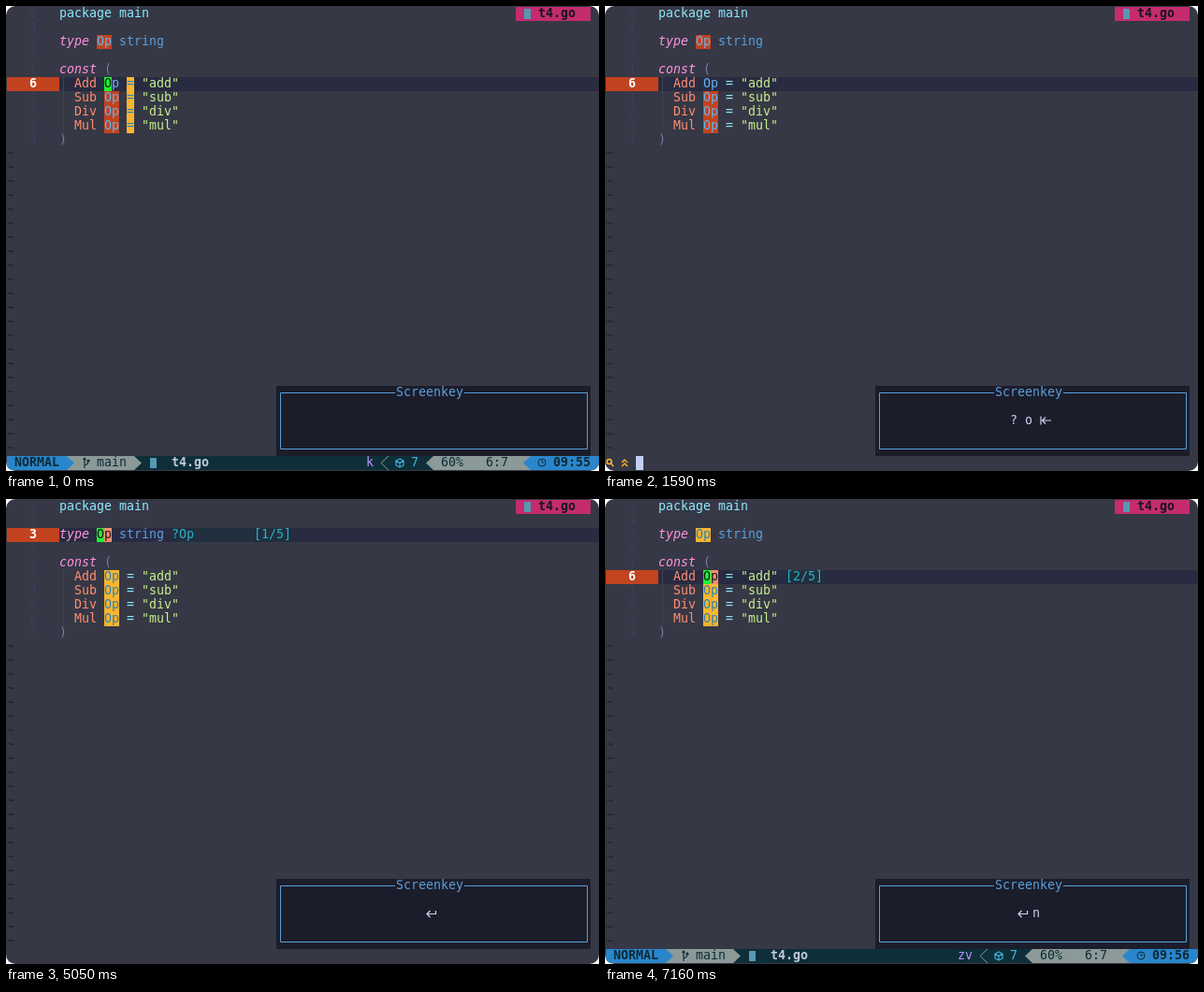
Animation, 634 px wide and 497 px high, one loop 8000 ms. Source, as an HTML page with a canvas:

```html
<!DOCTYPE html>
<html lang="en">
<head>
<meta charset="utf-8">
<title>Backward search in a terminal editor</title>
<style>
  html, body { margin: 0; width: 100%; height: 100%; overflow: hidden; background: #fff; }
  canvas { display: block; width: 634px; height: 497px; }
</style>
</head>
<body>
<canvas id="screen" width="634" height="497"></canvas>
<script>
const ctx = document.getElementById('screen').getContext('2d');
const CELL_W = 8, CELL_H = 15, LOOP = 8000, BOTTOM = 33;
const COLOR = {
  bg: '#363845', line: '#292b41', number: '#c2431f', dim: '#3c3e5a', tilde: '#20222f',
  cyan: '#8be9fd', blue: '#5a9fdc', type: '#61b5f2', pink: '#ff92df', orange: '#ff8d70',
  string: '#c6f08e', paren: '#6f7cab', match: '#fdb52e', matchText: '#2b83b8',
  current: '#ff8c6e', cursor: '#1cf52e', dark: '#14151f', hint: '#26b3c4', hintBg: '#212f3f',
  panel: '#1c1d2a', light: '#c9d3f0', bar: '#0e2f39', gray: '#8b9a98',
  accent: '#2a86cb', ink: '#0d2a35', pale: '#c0cad8', purple: '#b596f5', tab: '#c42c6d'
};

// search: highlighted pattern; prompt: command line text; crumb: status bar symbol
const steps = [
  { at: 0, line: 6, search: '=', keys: '', status: '09:55', pending: 'k' },
  { at: 540, line: 6, search: '=', keys: '?' },
  { at: 800, line: 6, search: '=', keys: '?', prompt: '' },
  { at: 1060, line: 5, search: 'o', keys: '?o', prompt: 'o' },
  { at: 1590, line: 6, search: '', keys: '?o⇤', prompt: '' },
  { at: 1850, line: 3, search: 'O', keys: '?o⇤O', prompt: 'O' },
  { at: 2110, line: 3, search: 'Op', keys: '?o⇤Op', prompt: 'Op' },
  { at: 5050, line: 3, search: 'Op', keys: '↩', hint: true },
  { at: 5310, line: 3, search: 'Op', keys: '↩', hint: true, status: '09:56', pending: '?', crumb: true },
  { at: 6370, line: 6, search: 'Op', keys: '↩n', hint: true, status: '09:56', pending: 'zv', crumb: true },
  { at: 6640, line: 6, search: 'Op', keys: '↩n', hint: true, status: '09:56', pending: 'zv' }
];

const colX = col => 1 + col * CELL_W;
const rowY = row => 1 + (row - 1) * CELL_H;

function fill(row, col, cols, color, rows = 1) {
  ctx.fillStyle = color;
  ctx.fillRect(colX(col), rowY(row), cols * CELL_W, rows * CELL_H);
}

function put(row, col, text, color, style = '', bg) {
  if (bg) fill(row, col, text.length, bg);
  ctx.font = `${style} 13.29px "DejaVu Sans Mono", monospace`;
  ctx.fillStyle = color;
  [...text].forEach((char, i) => ctx.fillText(char, colX(col + i), rowY(row) + 11));
}

function stroke(color, path, x = 0, y = 0, width = 1.2) {
  ctx.save();
  ctx.translate(x, y);
  ctx.strokeStyle = color;
  ctx.lineWidth = width;
  ctx.stroke(new Path2D(path));
  ctx.restore();
}

// Powerline wedge on the status bar: dir 1 points right, -1 points left
function wedge(col, color, dir) {
  const base = colX(dir > 0 ? col : col + 1), y = rowY(BOTTOM);
  ctx.fillStyle = color;
  ctx.beginPath();
  ctx.moveTo(base, y);
  ctx.lineTo(base + dir * CELL_W, y + CELL_H / 2);
  ctx.lineTo(base, y + CELL_H);
  ctx.fill();
}

function fileIcon(row, col) {
  ctx.fillStyle = '#5599b3';
  ctx.fillRect(colX(col) + 1, rowY(row) + 2, 7, 11);
}

function drawOp(row, col, step) {
  const current = row === step.line;
  const matched = step.search === 'Op' ? 2 : /^o$/i.test(step.search) ? 1 : 0;
  [...'Op'].forEach((char, i) => {
    let bg = row === 6 ? null : COLOR.number, color = COLOR.type;
    if (i < matched) {
      bg = current ? COLOR.current : COLOR.match;
      color = current ? COLOR.dark : COLOR.matchText;
    }
    if (current && i === 0 && step.prompt === undefined) {
      bg = COLOR.cursor;
      color = COLOR.dark;
    }
    put(row, col + i, char, color, '', bg);
  });
}

function drawBuffer(step) {
  fill(step.line, 0, 79.2, COLOR.line);
  fill(step.line, 0, 7, COLOR.number);
  for (let row = 1; row <= 10; row++) {
    if (row === step.line) put(row, 3, String(row), '#fff', 'bold');
    else put(row, 3, String(Math.abs(row - step.line)), COLOR.dim);
  }
  for (let row = 11; row < BOTTOM; row++) put(row, 0, '~', COLOR.tilde);

  put(1, 7, 'package main', COLOR.cyan);
  put(3, 7, 'type', COLOR.pink, 'italic');
  drawOp(3, 12, step);
  put(3, 15, 'string', COLOR.blue);
  put(5, 7, 'const', COLOR.pink, 'italic');
  if (step.search === 'o') put(5, 8, 'o', COLOR.dark, 'italic', COLOR.current);
  put(5, 13, '(', COLOR.paren);
  ['Add', 'Sub', 'Div', 'Mul'].forEach((name, i) => {
    const row = 6 + i, equals = step.search === '=';
    ctx.fillStyle = '#414353';
    ctx.fillRect(61, rowY(row), 1, CELL_H);
    put(row, 9, name, COLOR.orange);
    drawOp(row, 13, step);
    put(row, 16, '=', equals ? COLOR.matchText : COLOR.cyan, '', equals && COLOR.match);
    put(row, 18, `"${name.toLowerCase()}"`, COLOR.string);
  });
  put(10, 7, ')', COLOR.paren);

  if (step.hint && step.line === 3) put(3, 22, '?Op'.padEnd(11) + '[1/5]', COLOR.hint, '', COLOR.hintBg);
  else if (step.hint) put(6, 24, '[2/5]', COLOR.hint, '', COLOR.hintBg);

  fill(1, 68, 10, COLOR.tab);
  fileIcon(1, 69);
  put(1, 71, 't4.go', COLOR.dark, 'bold');
}

function drawKeys(keys) {
  fill(28, 36, 42, COLOR.panel, 5);
  stroke(COLOR.blue, 'M416 413.5H293.5V473.5H621.5V413.5H490', 0, 0, 1);
  put(28, 52, 'Screenkey', COLOR.blue);
  [...keys].forEach((key, i) => {
    const col = 57 - keys.length + 2 * i, x = colX(col), y = rowY(30);
    if (key === '⇤') stroke(COLOR.light, 'M1 2.5V11.5M12 7H2.5M6 3.5L2.5 7L6 10.5', x, y);
    else if (key === '↩') stroke(COLOR.light, 'M10.5 4V7.5H1M4.5 4L1 7.5L4.5 11', x, y);
    else if (key === 'o' && keys === '?o') put(30, col, key, COLOR.matchText, '', COLOR.match);
    else put(30, col, key, COLOR.light);
  });
}

function drawStatus(step) {
  const y = rowY(BOTTOM), row = BOTTOM, onType = step.line === 3;
  fill(row, 0, 79.2, COLOR.bar);
  fill(row, 8, 9, COLOR.gray);
  wedge(17, COLOR.gray, 1);
  fill(row, 0, 8, COLOR.accent);
  wedge(8, COLOR.accent, 1);
  put(row, 1, 'NORMAL', COLOR.ink, 'bold');
  stroke(COLOR.ink, 'M3 2V13M3 9.5Q7 9.5 7 5M5.5 6L7 4L8.5 6M1.5 4L3 2L4.5 4', colX(10), y);
  put(row, 12, 'main', COLOR.ink);
  fileIcon(row, 19);
  put(row, 22, 't4.go', COLOR.pale, 'bold');
  if (step.crumb) {
    fill(row, 30, 6, COLOR.panel);
    stroke(COLOR.gray, 'M0 0L8 7.5L0 15', colX(28), y, 1);
    stroke('#63bce8', 'M1 6L4 3L7 6L4 9ZM6 5.5H10M7 5.5V11H10M10 5L12 3.5L14 5.5L12 7ZM10 11L12 9L14 11L12 13Z', colX(30), y);
    put(row, 32, 'Op', COLOR.pale);
  }

  put(row, 49 - step.pending.length, step.pending, COLOR.purple);
  stroke(COLOR.gray, 'M8 0L0 7.5L8 15', colX(50), y, 1);
  stroke('#45b5e0', 'M4 3L8 5V10L4 12L0 10V5ZM0 5L4 7.5L8 5M4 7.5V12', colX(52), y, 1.1);
  put(row, 54, '7', '#45b5e0');
  wedge(56, COLOR.gray, -1);
  fill(row, 57, 13, COLOR.gray);
  put(row, 58, onType ? '30%' : '60%', COLOR.ink);
  put(row, 64, onType ? '3:6' : '6:7', COLOR.ink);
  wedge(69, COLOR.accent, -1);
  fill(row, 70, 9.2, COLOR.accent);
  stroke(COLOR.ink, 'M8 7A4 4 0 1 1 0 7A4 4 0 1 1 8 7M4 4.5V7H6', colX(71), y, 1);
  put(row, 73, step.status, COLOR.ink, 'bold');
}

function drawPrompt(text) {
  const y = rowY(BOTTOM);
  stroke(COLOR.match, 'M6 6A2.5 2.5 0 1 1 1 6A2.5 2.5 0 1 1 6 6M5.5 8L8 11', colX(0), y, 1.5);
  stroke(COLOR.match, 'M1 7L4 4L7 7M1 11L4 8L7 11', colX(2), y, 1.4);
  put(BOTTOM, 4, text, '#7d86ad');
  fill(BOTTOM, 4 + text.length, 1, '#c3cff2');
}

function render(time) {
  const step = steps.filter(s => s.at <= time).pop();
  ctx.clearRect(0, 0, 634, 497);
  ctx.save();
  ctx.beginPath();
  ctx.roundRect(0, 0, 634, 497, 10);
  ctx.clip();
  ctx.fillStyle = COLOR.bg;
  ctx.fillRect(0, 0, 634, 497);
  drawBuffer(step);
  drawKeys(step.keys);
  if (step.status) drawStatus(step);
  if (step.prompt !== undefined) drawPrompt(step.prompt);
  ctx.restore();
}

const began = performance.now();
function tick() {
  render((performance.now() - began) % LOOP);
  requestAnimationFrame(tick);
}
tick();
</script>
</body>
</html>
```
